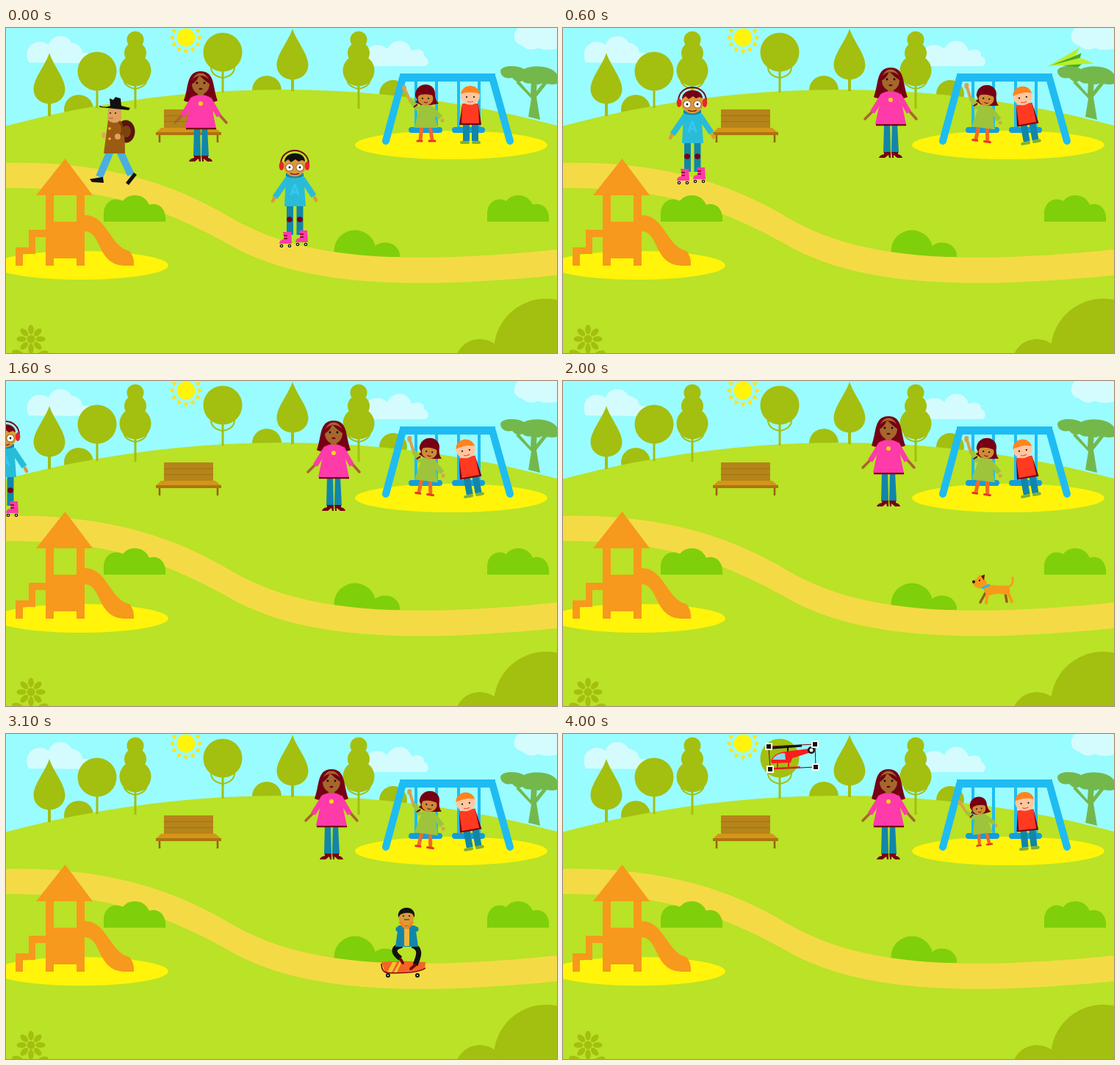
An HTML page with a canvas for the animation above (4.1 s loop, 750 by 443 pixels).

```html
<!DOCTYPE html>
<html lang="en">
<head>
<meta charset="utf-8">
<title>Park</title>
<style>
html, body { margin: 0; width: 100%; height: 100%; overflow: hidden; background: #bae226; }
canvas { display: block; }
</style>
</head>
<body>
<canvas id="stage" width="750" height="443"></canvas>
<script>
const ctx = document.getElementById('stage').getContext('2d');
const LOOP = 4100, STEP = 100, TAU = Math.PI * 2;
const OLIVE = '#a3bf10', LIME = '#bae226', YELLOW = '#fff40a', ORANGE = '#f7991c', BLUE = '#1ebcf2',
  MAROON = '#760014', PINK = '#ff3aa9', TEAL = '#1286a8', BLACK = '#111', BUSH = '#7fcf0a', CLOUD = '#d4fcff';

// Drawing helpers
function fill(color, d) { ctx.fillStyle = color; ctx.fill(new Path2D(d)); }
function stroke(color, width, d, cap = 'butt') {
  ctx.strokeStyle = color; ctx.lineWidth = width; ctx.lineCap = cap; ctx.lineJoin = 'round';
  ctx.stroke(new Path2D(d));
}
function oval(color, x, y, rx, ry = rx, turn = 0) {
  ctx.fillStyle = color; ctx.beginPath(); ctx.ellipse(x, y, rx, ry, turn, 0, TAU); ctx.fill();
}
function rect(color, x, y, w, h) { ctx.fillStyle = color; ctx.fillRect(x, y, w, h); }
function placed(dx, dy, draw, { x = 0, y = 0, turn = 0, scale = 1 } = {}) {
  ctx.save();
  ctx.translate(dx + x, dy + y); ctx.rotate(turn); ctx.scale(scale, scale); ctx.translate(-x, -y);
  draw();
  ctx.restore();
}
// Interpolates rows of [key, ...values], held at both ends
function along(rows, key) {
  if (key <= rows[0][0]) return rows[0].slice(1);
  const i = rows.findIndex(r => r[0] >= key);
  if (i < 0) return rows[rows.length - 1].slice(1);
  const a = rows[i - 1], b = rows[i], k = (key - a[0]) / (b[0] - a[0]);
  return a.slice(1).map((v, j) => v + (b[j + 1] - v) * k);
}
const TRACK = [[-60, 201], [60, 201], [140, 209], [220, 235], [300, 276], [380, 312],
  [460, 327], [560, 332], [660, 328], [810, 315]];
const trackY = x => along(TRACK, x)[0];

// Scenery
function dropTree(x, y, base) {
  rect(OLIVE, x - 2, y + 60, 4, base - y - 60);
  fill(OLIVE, `M${x} ${y}C${x + 5} ${y + 16} ${x + 21} ${y + 34} ${x + 21.5} ${y + 49}
    C${x + 21} ${y + 76} ${x - 21} ${y + 76} ${x - 21.5} ${y + 49}C${x - 21} ${y + 34} ${x - 5} ${y + 16} ${x} ${y}Z`);
}
function roundTree(x, y, r, base) {
  rect(OLIVE, x - 1.5, y, 3, base - y);
  oval(OLIVE, x, y, r);
}
function twigs(x, y) { stroke(OLIVE, 2, `M${x - 16} ${y - 12}Q${x - 16} ${y} ${x} ${y + 3}Q${x + 16} ${y} ${x + 16} ${y - 12}`); }
function stackTree(x) {
  rect(OLIVE, x - 1.5, 70, 3, 40);
  oval(OLIVE, x, 16, 11.5);
  oval(OLIVE, x, 34, 15);
  oval(OLIVE, x, 58, 21.5);
  twigs(x, 80);
}
function bush(dx) {
  fill(BUSH, `M${133 + dx} 264V252C${134 + dx} 234 ${150 + dx} 230 ${159 + dx} 236
    C${166 + dx} 225 ${188 + dx} 224 ${195 + dx} 241C${207 + dx} 237 ${219 + dx} 246 ${217 + dx} 264Z`);
}
function sky() {
  rect('#99fcff', 0, 0, 750, 443);
  fill(CLOUD, 'M31 47C24 32 33 17 49 19C53 20 56 21 58 23C62 8 83 7 89 20C98 21 104 27 104 34C115 32 122 41 117 48Z');
  fill(CLOUD, 'M492 52V28C500 21 513 22 519 29C525 14 547 13 552 31C564 26 570 32 569 38C577 42 576 50 571 52Z');
  fill(CLOUD, 'M697 0C688 9 691 22 703 24C709 31 719 30 724 27C733 31 743 30 750 28V0Z');
  for (let i = 0; i < 12; i++)
    placed(245, 13, () => fill('#ffe31a', 'M-3.500 -16.500L0 -23L3.500 -16.500Z'), { turn: i * TAU / 12 + Math.PI });
  oval(YELLOW, 245, 13, 12.5);
}
function landscape() {
  oval(OLIVE, 99, 111, 20);
  oval(OLIVE, 355, 85, 20);
  oval(OLIVE, 527, 90, 19);
  oval(LIME, 376, 1534, 1450);
  dropTree(59, 34, 120);
  roundTree(124, 59, 26.5, 109);
  stackTree(176);
  roundTree(295, 33, 26.5, 88);
  twigs(295, 65);
  dropTree(390, 1, 86);
  stackTree(480);
  fill('#74b84c', `M673 58C676 50 697 51 705 56C718 49 744 52 750 63V76C738 79 731 73 726 77
    C714 75 707 77 703 72C696 76 691 70 689 68C679 70 673 65 673 58Z`);
  fill('#74b84c', 'M698 72L714 90L715 72H723L722 86L733 72L737 75L722 94L727 125L711 121L715 96L694 74Z');

  oval(BUSH, 475, 304, 28.5);
  oval(BUSH, 516, 310, 20, 17.5);
  rect(LIME, 440, 312, 105, 25);
  fill('#f4db45', `M0 184C130 181 225 210 305 258C397 312 520 325 750 302V337
    C540 358 395 350 300 293C190 232 110 218 0 218Z`);
  bush(0);
  bush(522);
  oval(YELLOW, 102, 323.5, 119, 19.5);
  oval(YELLOW, 606, 159.5, 131, 19.5);
  oval(OLIVE, 735, 440, 71);
  oval(OLIVE, 645, 458, 34);

  for (let i = 0; i < 8; i++)
    placed(34, 424, () => oval(OLIVE, 0, -13, 3.8, 6.5), { turn: i * TAU / 8 });
  oval(OLIVE, 34, 424, 5.5);
  rect(OLIVE, 32.5, 430, 3, 13);
  oval(OLIVE, 16, 443, 8, 4, 0.3);
  oval(OLIVE, 50, 444, 8, 4, -0.3);
}
function tower() {
  fill(ORANGE, 'M80.500 178L118 228H41Z');
  fill(ORANGE, `M54 228H65V264H96V228H107V255C138 255 141 298 168 304Q175 312 174 324H160
    C123 321 131 278 107 277V324H96V314H65V324H54V285H40V308H23V324H13V299H31V275H54Z`);
}
function bench() {
  rect('#b5841a', 215, 111, 67, 25);
  stroke('#9f7410', 1, 'M215 119.500H282M215 127.500H282');
  fill('#d4951a', 'M211 136H285L293 143H204Z');
  rect('#ad730d', 204, 142, 89, 4);
  stroke('#946111', 2.500, 'M209 146V156M288 146V156');
}
function swingFrame() {
  stroke(BLUE, 10, 'M540 68L517 154M662 68L686 154', 'round');
  rect(BLUE, 536, 62, 130, 11);
  stroke(BLUE, 4, 'M558 70V138M586 70V138M616 70V138M644 70V138');
  stroke('#149ddb', 8, 'M552 139H590M611 139H648', 'round');
}

// People and things
function eyes(x1, x2, y, r = 1.3) { oval(BLACK, x1, y, r); oval(BLACK, x2, y, r); }
function girl() {
  fill(MAROON, 'M557 93C556 72 586 72 584 92Q585 100 589 103L578 105H565L557 101L560 98Z');
  stroke('#9dc43b', 6, 'M561 111L550 98');
  stroke(MAROON, 2, 'M555 108L560 104');
  stroke('#d9a24a', 4, 'M549 97L543 84', 'round');
  oval('#d9a24a', 542, 82, 3, 4);
  stroke('#9dc43b', 7, 'M578 109L592 122');
  oval('#d9a24a', 594, 126, 2.5);
  stroke('#f26a28', 5, 'M566 132L564 153M577 132L580 153');
  stroke('#e8352b', 3, 'M560 154H566M576 154H584', 'round');
  fill('#9dc43b', 'M563 105H579L588 136H556Z');
  oval('#d08a38', 571, 96, 10.5, 9.5);
  fill(MAROON, 'M560 93C562 78 581 78 583 93C576 90 568 89 560 93Z');
  eyes(567, 575, 96, 1.1);
  stroke(MAROON, 1, 'M569 101Q572 103 574 101');
}
function boy() {
  stroke(TEAL, 9, 'M626.500 128V154M638.500 128V154');
  stroke('#7faf37', 4, 'M620 156H629M636 156H644', 'round');
  fill(MAROON, 'M621 104H643L647 132H617Z');
  fill('#ff3a20', 'M621 103H643L644 130H620Z');
  oval('#ffc6a0', 632, 93, 13, 11.5);
  fill('#ff8420', 'M619 90C621 75 643 75 645 90C638 87 626 87 619 90Z');
  eyes(627, 637, 94, 1.1);
  stroke('#e2554a', 1.200, 'M628 100Q632 102 636 100');
}
function woman() {
  fill(MAROON, 'M446 54C426 54 430 76 423 94C428 97 435 96 438 92H455C457 96 464 97 469 94C462 76 466 54 446 54Z');
  stroke('#a5672c', 3.500, 'M421 114L411 124M472 114L481 124', 'round');
  stroke(PINK, 7, 'M436 91L421 115M457 91L471 115');
  fill(TEAL, 'M437 130H445L446 170H436ZM448 130H455L457 170H447Z');
  fill(MAROON, 'M437 169H446V177H444L443 173L438 177H430Q431 173 437 172ZM447 169H456V172Q461 173 462 177H455L450 173V177H448Z');
  stroke(MAROON, 2.500, 'M426 132H467');
  fill(PINK, 'M434 89Q446 83 458 89L467 131H425Z');
  rect('#a5672c', 442, 79, 8, 8);
  oval('#a5672c', 446, 71, 12, 14.5);
  fill(MAROON, 'M433 72C433 56 459 56 459 72C454 68 448 64 444 59C442 65 438 70 433 72Z');
  eyes(441, 451, 70, 1.4);
  oval(MAROON, 446, 78, 2.6, 1.2);
  oval('#ffd21c', 446, 98, 3);
}
function skate(x, y) {
  fill(PINK, `M${x + 5} ${y}H${x + 16}L${x + 17} ${y + 16}H${x}Q${x} ${y + 10} ${x + 7} ${y + 10}Z`);
  stroke(MAROON, 1.5, `M${x + 6} ${y + 5}H${x + 11}M${x + 6} ${y + 9}H${x + 11}`);
  for (const wheel of [x + 3, x + 14]) {
    oval(BLACK, wheel, y + 19, 2.3);
    oval('#fff', wheel, y + 19, 0.9);
  }
}
function skater(hair) {
  stroke(TEAL, 9, 'M169.500 154V196M183 154V196');
  oval(MAROON, 169, 175, 4, 3.7);
  oval(MAROON, 183, 175, 4, 3.7);
  skate(155, 192);
  skate(177, 190);
  stroke('#29bcd8', 8, 'M167 119L149 145M186 119L202 143');
  stroke('#d99a3a', 4.500, 'M148 146L146 150M203 145L205 149', 'round');
  rect(TEAL, 164, 112, 24, 8);
  fill('#29bcd8', 'M164 116Q176 121 188 116L191 157H162Z');
  ctx.fillStyle = '#35c8f5';
  ctx.font = 'bold 20px Roboto, sans-serif';
  ctx.textAlign = 'center';
  ctx.fillText('A', 176, 142);
  oval('#d99a3a', 176, 102, 15, 14.5);
  fill(hair, 'M162 97C162 81 190 81 190 96L186 94L181 96L177 93L171 97L167 93Z');
  stroke(MAROON, 1.8, 'M157 99C158 75 194 75 195 99');
  oval('#e9252b', 158, 102, 3.3, 6);
  oval('#e9252b', 193, 102, 3.3, 6);
  for (const x of [169, 183]) {
    oval('#9b601d', x, 104, 5.6);
    oval('#fff', x, 104, 4.6);
    oval(BLACK, x, 104, 1.4);
  }
  stroke(MAROON, 1.2, 'M170 112Q176 115 182 112');
}
function walker(stride) {
  const front = 148 - 21 * stride, rear = 148 + 22 * stride;
  stroke('#4aaee0', 10, `M155 168L${rear} 200M142 168L${front} 203`);
  fill(BLACK, `M${front - 13} 206L${front + 5} 203L${front + 6} 211L${front - 10} 210Z`);
  fill(BLACK, `M${rear + 4} 197L${rear + 8} 200L${rear - 3} 214L${rear - 7} 211Z`);
  oval('#5a1410', 163, 141, 12.5, 15.5);
  fill('#9c5b12', 'M139 125H155Q162 134 162 171H133Z');
  stroke('#7b420c', 3, 'M154 128Q164 139 152 151');
  oval('#7b420c', 164, 141, 6, 8);
  oval('#e0a060', 152, 148, 4);
  oval('#e0a060', 133, 146, 2.5, 4);
  oval('#f4b93c', 141, 137, 1.8);
  oval('#f4b93c', 141, 151, 1.8);
  fill('#e0a060', 'M139 110H157V123Q154 130 146 129Q137 128 138 119Z');
  eyes(142, 149, 116, 1);
  stroke('#a4652b', 1, 'M140 123H146');
  fill(BLACK, 'M127 106Q136 109 142 106L141 96L146 98L149 94L156 96L157 106L169 109L167 112L128 108Z');
}
function plane() {
  fill('#b9ee2e', 'M167 66L214 44L206 56Z');
  fill('#43ae20', 'M171 65L206 55L215 52L212 61Z');
  fill('#b9ee2e', 'M168 65L213 58L231 68Z');
  fill('#43ae20', 'M188 66L214 67L209 71Z');
}
function dog(stride) {
  const s = 5 * stride;
  stroke('#91601a', 3.5, `M315 245L${313 - s} 258M342 245L${339 + s} 257`, 'round');
  stroke(ORANGE, 4, `M318 244L${321 - s} 259M345 243L${346 + s} 257`, 'round');
  stroke(ORANGE, 2.5, 'M345 238Q354 234 352 224', 'round');
  fill(ORANGE, 'M313 233Q331 236 345 235Q351 240 346 248Q331 244 319 249Q311 245 313 233Z');
  fill(ORANGE, 'M297 229L304 225L307 220L311 225Q319 229 316 236L309 239Q298 239 297 229Z');
  fill(MAROON, 'M309 222L314 220L313 228Z');
  oval(BLACK, 299, 230, 2);
  eyes(307, 307, 228, 1.1);
  stroke(BLUE, 3, 'M310 239L321 234');
}
function boarder() {
  fill('#f26522', 'M511 311Q541 308 571 311L570 321Q557 326 516 325Z');
  fill('#f4c430', 'M526 311H532L525 325H519ZM536 310H539L532 325H528Z');
  stroke(MAROON, 1.5, 'M511 313Q511 325 520 325.500Q560 327 571 319');
  for (const x of [520, 560]) { oval(BLACK, x, 329, 3); oval('#fff', x, 329, 0.9); }
  stroke(BLACK, 7, 'M539 288C523 292 529 300 537 306M553 288C567 293 561 304 557 315');
  stroke(MAROON, 4, 'M537 307L540 312M557 315L551 320', 'round');
  fill(TEAL, 'M534 261H557L561 290H530Z');
  stroke(TEAL, 7, 'M534 266H541M550 266H558', 'round');
  rect('#f0b53c', 542, 262, 7, 27);
  oval('#d99a3a', 545, 249, 10.5, 12);
  fill(BLACK, 'M534 250C531 233 559 232 556 250L553 245Q545 242 537 246Z');
  eyes(541, 549, 248, 1);
  stroke('#f58220', 4, 'M537 257L543 264M553 257L547 264', 'round');
  stroke(MAROON, 1, 'M542 253H549');
}
function helicopter() {
  stroke(MAROON, 1, 'M280 17L343 14L344 45L282 48Z');
  stroke(BLACK, 3, 'M285 19L325 16');
  stroke(BLACK, 2, 'M306 18V25');
  fill('#fb1d20', 'M283 36Q289 25 302 24L335 20L337 25L312 33L310 39L284 40Z');
  fill('#8bd7ef', 'M285 35Q290 26 302 26L303 35Z');
  stroke('#fb1d20', 2, 'M284 47L323 45M292 40V46M307 39V45');
  oval(BLACK, 338, 22, 5);
  oval('#f2f2f2', 338, 22, 2.5);
  for (const [x, y] of [[280, 17], [343, 14], [282, 48], [344, 45]]) {
    rect('#fff', x - 5, y - 5, 10, 10);
    rect(BLACK, x - 3, y - 3, 6, 6);
  }
}

// Motion: rows are [time, ...values]
const WOMAN = [[0, -181, 5], [600, 0, 0], [1700, 0, 0], [2000, -3, -6]];
const SKATER = [[0, 393, 300], [300, 284, 256], [600, 176, 214], [1000, 175, 213], [1100, 173, 213],
  [1600, -1, 188], [1800, -71, 187]];
const PLANE = [[500, 646, -28, -0.14], [600, 492, -13, -0.1], [1000, 0, 0, 0], [1200, -246, 6, 0]];
const GIRL = [[0, 0, 1], [600, 0.13, 1], [3300, 0.13, 1], [4000, -0.13, 0.86]];
const BOY = [[0, 0], [600, -0.18], [3300, -0.18], [4000, -0.1]];
const during = (t, from, to) => t >= from && t <= to;

function draw(t) {
  sky();
  landscape();
  tower();
  bench();
  swingFrame();
  const [girlTurn, girlScale] = along(GIRL, t);
  placed(0, 0, girl, { x: 570, y: 136, turn: girlTurn, scale: girlScale });
  placed(0, 0, boy, { x: 633, y: 128, turn: along(BOY, t)[0] });
  placed(...along(WOMAN, t), woman);

  if (t < 600) {
    const x = 147 - 0.38 * t;
    placed(x - 147, trackY(x) - trackY(147), () => walker(Math.cos(t * TAU / 600)));
  }
  if (t < 1800) {
    const [x, feet] = along(SKATER, t);
    placed(x - 176, feet - 214, () => skater(t < 300 ? BLACK : MAROON));
  }
  if (during(t, 500, 1200)) {
    const [dx, dy, turn] = along(PLANE, t);
    placed(dx, dy, plane, { x: 167, y: 66, turn });
  }
  if (during(t, 1700, 3000)) {
    const x = 325 + (2400 - t) * 0.65;
    placed(x - 325, trackY(x) - trackY(325), () => dog(Math.cos(t * TAU / 400)));
  }
  if (during(t, 2700, 3900)) {
    const x = 541 + (3100 - t) * 0.68;
    placed(x - 541, trackY(x) - trackY(541), boarder);
  }
  if (t >= 3500) placed(4000 - t, (4000 - t) * 0.02, helicopter);
}

const start = performance.now();
function frame() {
  const t = (performance.now() - start) % LOOP;
  draw(Math.floor(t / STEP) * STEP);
  requestAnimationFrame(frame);
}
frame();
</script>
</body>
</html>
```
